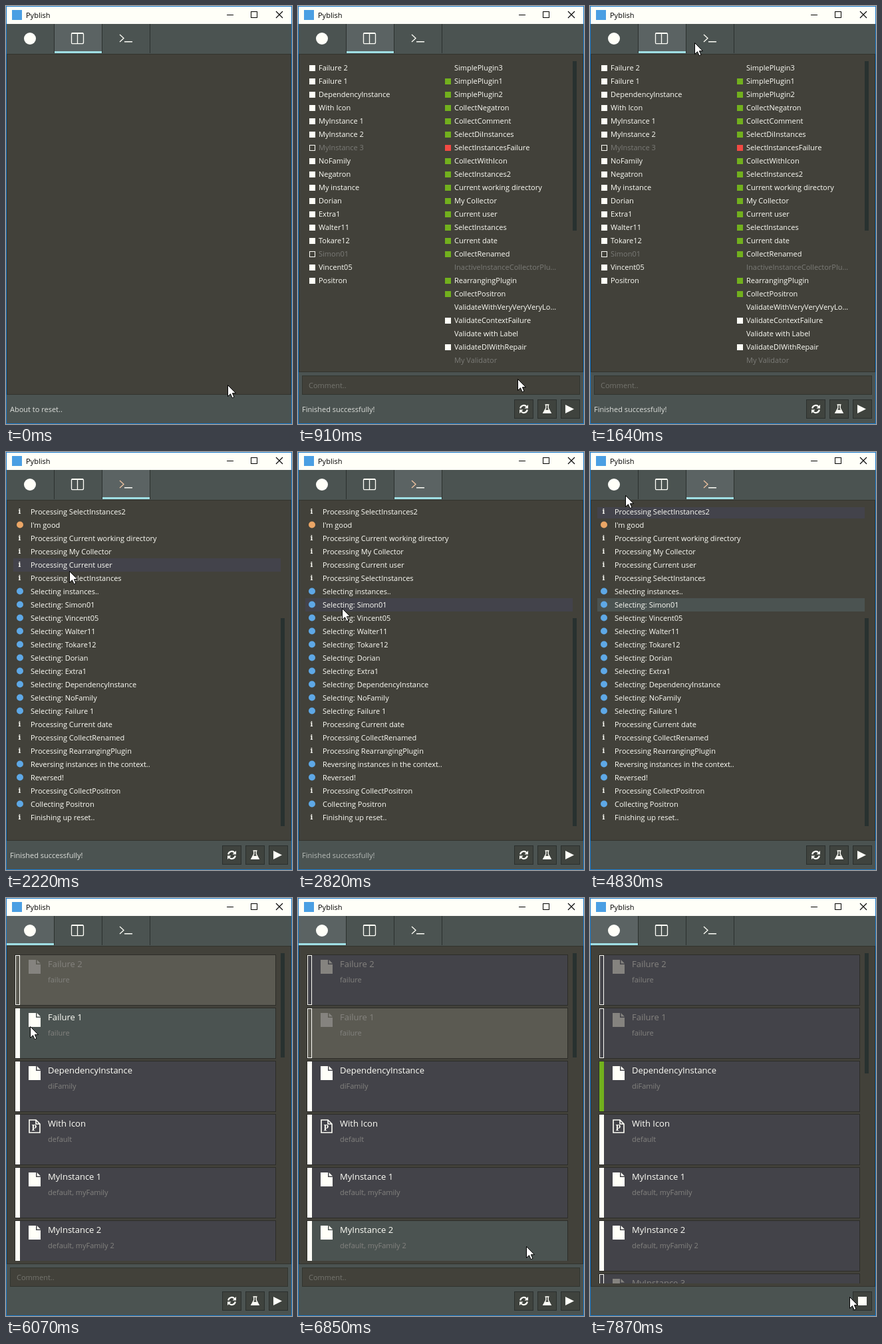
Recreate the animation shown at these times as an HTML page with a canvas. Size 430 by 629 pixels, loop 8000 ms.

```html
<!DOCTYPE html>
<html lang="en">
<head>
<meta charset="utf-8">
<title>Pyblish</title>
<style>
  html, body { margin: 0; width: 100%; height: 100%; overflow: hidden; background: #42413a; }
  canvas { display: block; width: 430px; height: 629px; }
</style>
</head>
<body>
<canvas id="stage"></canvas>
<script>
const W = 430, H = 629, LOOP = 8000;
const canvas = document.getElementById('stage');
const dpr = window.devicePixelRatio || 1;
canvas.width = W * dpr;
canvas.height = H * dpr;
const c = canvas.getContext('2d');

const SANS = '"Open Sans", sans-serif';
const MONO = '"Liberation Mono", monospace';
const SERIF = '"Noto Serif", serif';
const WHITE = '#fffff8', BODY = '#42413a', BAR = '#4b5351', DARK = '#2b302e';
const HOVER = '#43434b', PICKED = '#5b5a52', DIM = '#7b7b77', SCROLL = '#283130';
const GREEN = '#72b01d', RED = '#f24a43', BLUE = '#5ea8e6', ORANGE = '#eba666';

// Moments at which the interface changes state
const T = {
  plugins: 30, collect: 90, perPlugin: 35, finishing: 735, ready: 800, done: 850,
  terminal: 1760, fade: 2520, faded: 3680, pickRow: 2980, tip: 3200, tipOff: 4380,
  home: 5010, pick1: 5700, pick2: 6250, play: 7330, stop: 7610, green: 7700
};

const cursorPath = [
  [0, 333, 570], [850, 333, 570], [1640, 157, 55], [1800, 158, 56], [2460, 68, 232],
  [2820, 66, 235], [3350, 64, 233], [3880, 64, 233], [3910, 62, 231], [4340, 62, 231],
  [4830, 53, 65], [5000, 51, 60], [5160, 51, 60], [5620, 38, 146], [5960, 38, 146],
  [6070, 36, 193], [6300, 36, 193], [6760, 330, 507], [7100, 405, 605], [7600, 405, 605],
  [7800, 390, 600], [8000, 390, 600]
];

const instances = ['Failure 2', 'Failure 1', 'DependencyInstance', 'With Icon', 'MyInstance 1',
  'MyInstance 2', '-MyInstance 3', 'NoFamily', 'Negatron', 'My instance', 'Dorian', 'Extra1',
  'Walter11', 'Tokare12', '-Simon01', 'Vincent05', 'Positron'];

const plugins = ['SimplePlugin3', 'SimplePlugin1', 'SimplePlugin2', 'CollectNegatron',
  'CollectComment', 'SelectDiInstances', 'SelectInstancesFailure', 'CollectWithIcon',
  'SelectInstances2', 'Current working directory', 'My Collector', 'Current user',
  'SelectInstances', 'Current date', 'CollectRenamed', '-InactiveInstanceCollectorPlu...',
  'RearrangingPlugin', 'CollectPositron', 'ValidateWithVeryVeryVeryLo...',
  '+ValidateContextFailure', 'Validate with Label', '+ValidateDIWithRepair',
  '-My Validator', 'ValidateInstance', 'ValidateFailure'];
const COLLECTORS = 18;

// Log rows: "i" marks information, "*" a warning, "o" a record
const log = ['iProcessing SelectInstances2', "*I'm good", 'iProcessing Current working directory',
  'iProcessing My Collector', 'iProcessing Current user', 'iProcessing SelectInstances',
  'oSelecting instances..',
  ...['Simon01', 'Vincent05', 'Walter11', 'Tokare12', 'Dorian', 'Extra1', 'DependencyInstance',
    'NoFamily', 'Failure 1'].map(n => 'oSelecting: ' + n),
  'iProcessing Current date', 'iProcessing CollectRenamed', 'iProcessing RearrangingPlugin',
  'oReversing instances in the context..', 'oReversed!', 'iProcessing CollectPositron',
  'oCollecting Positron', 'iFinishing up reset..'];
const PICKED_ROW = 7;

const cards = [['Failure 2', 'failure'], ['Failure 1', 'failure'], ['DependencyInstance', 'diFamily'],
  ['With Icon', 'default'], ['MyInstance 1', 'default, myFamily'],
  ['MyInstance 2', 'default, myFamily 2'], ['MyInstance 3', 'default, myFamily']];

const record = [['name:'], ['pyblish.pyblish.plugin.SelectInstances'], ['threadName:', 'MainThread'],
  ['msecs:', '517.999887466'], ['label:', 'Selecting: Simon01'], ['pathname:', 'pyblish_lite\\mock.py'],
  ['lineno:', '110'], ['msg:', 'Selecting: Simon01'], ['filename:', 'mock.py'],
  ['type:', 'record'], ['levelname:', 'INFO']];

function fill(x, y, w, h, color) {
  c.fillStyle = color;
  c.fillRect(x, y, w, h);
}
function frame(x, y, w, h, color, width = 1) {
  c.strokeStyle = color;
  c.lineWidth = width;
  c.strokeRect(x + width / 2, y + width / 2, w - width, h - width);
}
function text(str, x, y, color = WHITE, size = 11, family = SANS, weight = 400) {
  c.font = `${weight} ${size}px ${family}`;
  c.fillStyle = color;
  c.fillText(str, x, y);
}
function disc(x, y, r, color) {
  c.fillStyle = color;
  c.beginPath();
  c.arc(x, y, r, 0, Math.PI * 2);
  c.fill();
}
function shape(d, x, y, color, line) {
  c.save();
  c.translate(x, y);
  const p = new Path2D(d);
  if (line) {
    c.lineWidth = line;
    c.strokeStyle = color;
    c.stroke(p);
  } else {
    c.fillStyle = color;
    c.fill(p);
  }
  c.restore();
}
function clipped(bottom, draw) {
  c.save();
  c.beginPath();
  c.rect(2, 83, 426, bottom - 83);
  c.clip();
  draw();
  c.restore();
}

function cursorAt(t) {
  const i = Math.max(1, cursorPath.findIndex(k => k[0] > t));
  const [t0, x0, y0] = cursorPath[i - 1], [t1, x1, y1] = cursorPath[i];
  const u = (t - t0) / (t1 - t0), e = u * u * (3 - 2 * u);
  return { x: Math.round(x0 + (x1 - x0) * e), y: Math.round(y0 + (y1 - y0) * e) };
}

function drawWindow(tab) {
  fill(0, 0, W, H, '#1979ca');
  fill(1, 1, 428, 26, WHITE);
  fill(9, 6, 15, 15, '#4a9fe3');
  text('Pyblish', 30, 18, '#000');
  fill(332, 13, 10, 1, '#000');
  frame(368, 8, 10, 10, '#000');
  shape('M0 0L10 10M10 0L0 10', 406, 8, '#000', 1.1);

  fill(1, 27, 428, 601, BAR);
  fill(1 + tab * 72, 27, 71, 41, '#5b6363');
  fill(1 + tab * 72, 68, 71, 3, '#a0dfe4');
  for (const x of [72, 144, 216]) fill(x, 27, 1, 44, DARK);

  disc(36, 49, 9, WHITE);
  shape('M1.5 .7h15q2 0 2 2v12q0 2-2 2h-15q-1 0-1-2v-12q0-2 1-2zM9.5 2v14', 98, 40, WHITE, 1.3);
  fill(99, 40, 17, 2, WHITE);
  shape('M0 0L6 5.5L0 11', 171, 43, tab === 2 ? '#efc3a0' : WHITE, 1.3);
  fill(178, 53, 12, 1.5, WHITE);
}

function drawBody(bottom) {
  fill(1, 72, 428, bottom - 72, BODY);
  frame(1, 72, 428, bottom - 72, '#32332d');
}

function listRow(label, x, y, mark, hover) {
  const off = label[0] === '-';
  if (hover) fill(x - 6, y, 198, 20, HOVER);
  if (mark === 'box') frame(x, y + 6, 9, 9, WHITE);
  else if (mark) fill(x, y + 6, 9, 9, mark);
  text(label.replace(/^[-+]/, ''), x + 14, y + 14, off ? DIM : WHITE);
}

function drawOverview(t, cur, bottom) {
  if (t < T.plugins) return;
  const end = bottom - 8;
  const doneCount = Math.floor((t - T.collect) / T.perPlugin);
  const over = (x, y) => cur.x >= x - 6 && cur.x < x + 192 && cur.y >= y && cur.y < y + 20 && cur.y < end;
  clipped(end, () => {
    if (t >= T.ready) instances.forEach((n, i) => {
      const y = 83 + 20 * i;
      listRow(n, 17, y, n[0] === '-' ? 'box' : WHITE, over(17, y));
    });
    plugins.forEach((n, i) => {
      const y = 83 + 20 * i;
      let mark = n[0] === '+' ? WHITE : null;
      if (i && i < COLLECTORS && i <= doneCount && n[0] !== '-') mark = i === 6 ? RED : GREEN;
      listRow(n, 221, y, mark, over(221, y));
    });
    fill(413, 83, 6, t < T.ready ? 288 : 255, SCROLL);
  });
}

function drawTerminal(t, cur) {
  const hover = cur.y >= 83 || t > T.tipOff ? Math.max(0, Math.floor((cur.y - 80) / 20)) : -1;
  clipped(577, () => {
    log.forEach((entry, i) => {
      const y = 80 + 20 * i, kind = entry[0];
      const picked = i === PICKED_ROW && t >= T.pickRow;
      if (picked) fill(11, y, 402, 20, i === hover ? PICKED : BAR);
      else if (i === hover) fill(11, y, 402, 20, HOVER);
      if (kind === 'i') text('i', 18.5, y + 13, WHITE, 11, SERIF, 700);
      else disc(21, y + 9.5, 5, kind === 'o' ? BLUE : ORANGE);
      text(entry.slice(1), 37, y + 14);
    });
    fill(413, 250, 6, 313, SCROLL);
  });
}

function drawTip(alpha) {
  c.save();
  c.globalAlpha = alpha;
  fill(68, 235, 302, 225, 'rgba(0,0,0,.28)');
  fill(65, 232, 303, 226, BODY);
  fill(65, 281, 303, 176, SCROLL);
  fill(65, 280, 303, 1, '#1f2524');
  frame(65, 232, 303, 226, '#23241f');
  disc(78.5, 247, 9, '#cfd3d4');
  text('Selecting: Simon01', 93, 252, '#dcdcd8', 12.5, SANS, 700);
  text('LogRecord (INFO)', 92, 274, '#d0d0cc');
  record.forEach(([key, value], i) => {
    text(key, 70, 298 + 15 * i, '#dcdedb', 11.667, MONO);
    if (value) text(value, 161, 298 + 15 * i, '#dcdedb', 11.667, MONO);
  });
  c.restore();
}

function drawCards(t, cur, bottom) {
  const end = bottom - 5;
  const hover = cur.y >= 85 && cur.y < end && cur.x < 406 ? Math.floor((cur.y - 85) / 80) : -1;
  const picked = t < T.pick1 || t >= T.play ? -1 : t < T.pick2 ? 0 : 1;
  clipped(end, () => {
    cards.forEach(([title, family], i) => {
      const y = 85 + 80 * i;
      const off = i === 6 || (i === 0 && t >= T.pick1) || (i === 1 && t >= T.pick2);
      fill(13, y, 393, 77, i === picked ? PICKED : i === hover ? BAR : '#434349');
      frame(13, y, 393, 77, '#2d2d29');
      if (off) frame(14, y + 1, 7, 75, WHITE);
      else fill(14, y + 1, 7, 75, i === 2 && t >= T.green ? GREEN : WHITE);
      const ink = off ? '#85837f' : WHITE;
      if (i === 3) {
        shape('M1 1h10l6 6v13h-16zM11 1v6h6', 34, y + 8, ink, 1.6);
        text('P', 38.5, y + 25, ink, 12, SERIF, 700);
      } else {
        shape('M0 0h11v7h7v14h-18zM12.5 0l5.5 5.5h-5.5z', 34, y + 8, ink);
      }
      text(title, 63, y + 19, ink, 13);
      text(family, 63, y + 42, '#83827f');
    });
  });
  fill(413, 83, 6, t < T.play ? 157 : 181, SCROLL);
}

function status(t) {
  if (t < T.collect) return 'About to reset..';
  if (t < T.finishing) {
    const i = Math.min(COLLECTORS - 1, 1 + Math.floor((t - T.collect) / T.perPlugin));
    return 'Processing ' + plugins[i === 15 ? 16 : i];
  }
  return t < T.done ? 'Finishing up reset..' : 'Finished successfully!';
}

function button(x) {
  fill(x, 592, 29, 29, '#3f433e');
  frame(x, 592, 29, 29, DARK);
}

function drawFooter(t, comment) {
  if (comment) {
    fill(6, 556, 418, 29, BODY);
    frame(6, 556, 418, 29, '#31352f');
    text('Comment..', 16, 575, '#74746e');
  }
  c.globalAlpha = Math.max(0, Math.min(1, (T.faded - t) / (T.faded - T.fade)));
  text(status(t), 6, 611, '#dcdeda');
  c.globalAlpha = 1;

  if (t >= T.ready && t < T.play) {
    [325, 360, 395].forEach(button);
    shape('M-5.3 -1A5.3 5.3 0 0 1 4 -3.6M5.3 1A5.3 5.3 0 0 1 -4 3.6', 339.5, 606.5, WHITE, 2.2);
    shape('M6.5-6.5v5.5h-5.5zM-6.5 6.5v-5.5h5.5z', 339.5, 606.5, WHITE);
    shape('M-3-6.5h6M-1.7-6v4.5L-5.6 5.8H5.6L1.7-1.5V-6', 374.5, 606.5, WHITE, 1.4);
    shape('M-2.8 1.2h5.6l2.4 4.4h-10.4z', 374.5, 606.5, WHITE);
    shape('M0 0L13 6.5L0 13z', 402, 600, WHITE);
  } else if (t >= T.stop) {
    button(395);
    fill(403, 600, 13, 13, WHITE);
  }
}

function drawCursor({ x, y }) {
  const d = 'M0 0V17L4 13.2L6.7 19.2L9.5 18L6.9 12.2H12z';
  shape(d, x + .5, y + .5, '#fff');
  shape(d, x + .5, y + .5, '#000', 1);
}

function draw(t) {
  const cur = cursorAt(t);
  const tab = t < T.terminal ? 1 : t < T.home ? 2 : 0;
  const comment = tab !== 2 && t >= T.ready && t < T.play;
  const bottom = comment ? 551 : 585;
  c.setTransform(dpr, 0, 0, dpr, 0, 0);
  drawWindow(tab);
  drawBody(bottom);
  if (tab === 1) drawOverview(t, cur, bottom);
  else if (tab === 2) drawTerminal(t, cur);
  else drawCards(t, cur, bottom);
  drawFooter(t, comment);
  if (t >= T.tip && t < T.tipOff) drawTip(Math.min(1, (t - T.tip) / 120));
  drawCursor(cur);
}

const start = performance.now();
function tick() {
  draw((performance.now() - start) % LOOP);
  requestAnimationFrame(tick);
}
tick();
</script>
</body>
</html>
```
